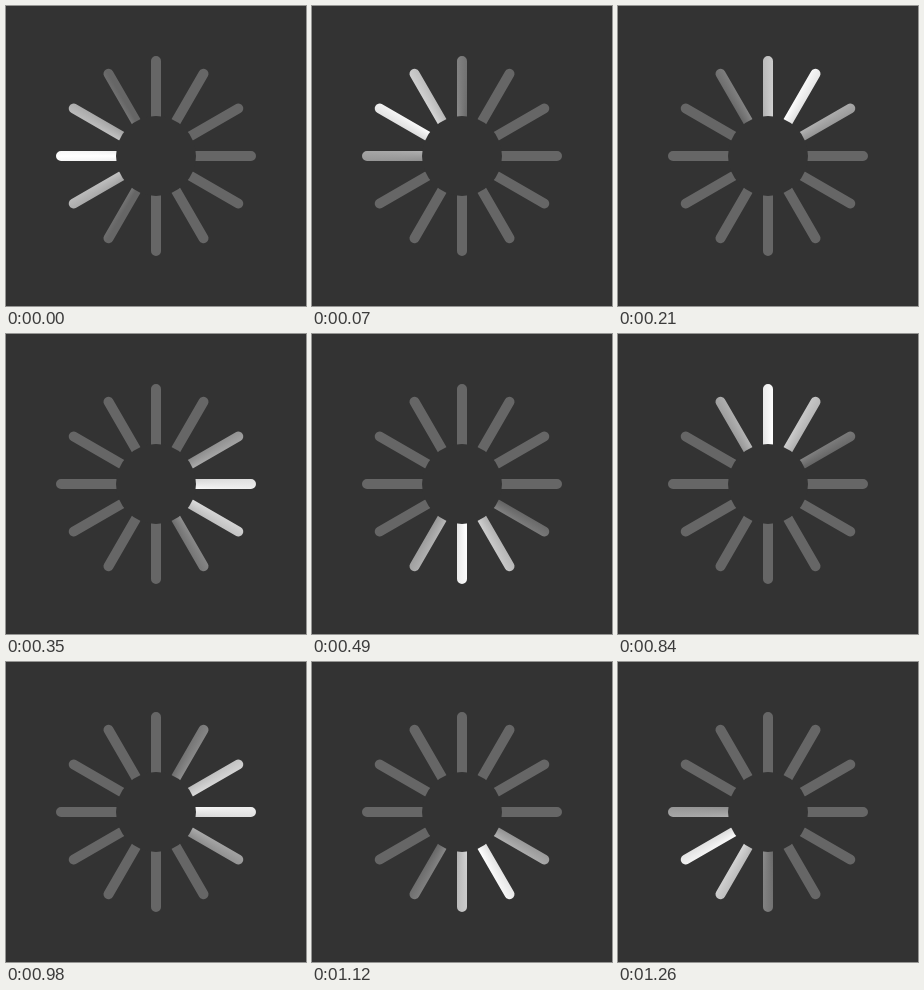
An HTML page with a canvas for the animation above (1330 ms loop, 300x300 px).

```html
<!DOCTYPE html>
<html lang="en">
<head>
<meta charset="utf-8">
<title>Spinner</title>
<style>
  html, body { margin: 0; width: 100%; height: 100%; overflow: hidden; background: #333; }
  canvas { display: block; width: 300px; height: 300px; }
</style>
</head>
<body>
<canvas id="stage"></canvas>
<script>
  const SIZE = 300, STEP = 70, STEPS = 19, TURNS = 2;
  const SPOKES = 12, HUB = 40, REACH = 95, WIDTH = 10;
  const BACK = '#333', DIM = '#666', LIT = '#fff';
  const TAU = Math.PI * 2;

  const canvas = document.getElementById('stage');
  const ctx = canvas.getContext('2d');
  const scale = window.devicePixelRatio || 1;
  canvas.width = canvas.height = Math.round(SIZE * scale);

  // Light fades evenly to the dim grey 60 degrees either side of its peak.
  function beam(angle) {
    const g = ctx.createConicGradient(angle, 0, 0);
    g.addColorStop(0, LIT);
    g.addColorStop(1 / 6, DIM);
    g.addColorStop(5 / 6, DIM);
    g.addColorStop(1, LIT);
    return g;
  }

  function draw(ms) {
    const step = Math.floor(ms / STEP) % STEPS;
    const angle = (Math.PI + TAU * TURNS * step / STEPS) % TAU;

    ctx.setTransform(scale, 0, 0, scale, 0, 0);
    ctx.fillStyle = BACK;
    ctx.fillRect(0, 0, SIZE, SIZE);
    ctx.translate(SIZE / 2, SIZE / 2);

    ctx.beginPath();
    for (let i = 0; i < SPOKES; i++) {
      const a = TAU * i / SPOKES;
      ctx.moveTo(0, 0);
      ctx.lineTo(REACH * Math.cos(a), REACH * Math.sin(a));
    }
    ctx.lineWidth = WIDTH;
    ctx.lineCap = 'round';
    ctx.strokeStyle = beam(angle);
    ctx.stroke();

    ctx.beginPath();
    ctx.arc(0, 0, HUB, 0, TAU);
    ctx.fill();
  }

  const start = performance.now();
  function tick() {
    draw(performance.now() - start);
    requestAnimationFrame(tick);
  }
  tick();
</script>
</body>
</html>
```
